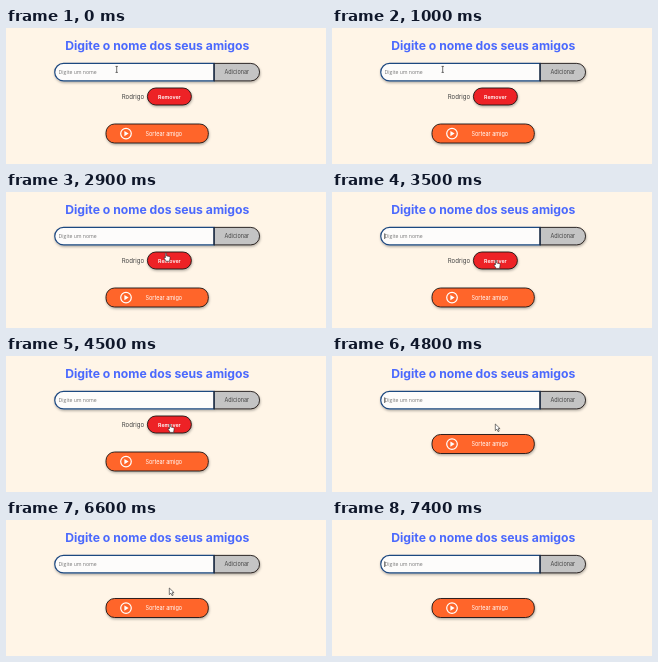
An HTML page for the animation above (7500 ms loop, 320x136 px).

```html
<!DOCTYPE html>
<html lang="pt-BR">
<head>
<meta charset="utf-8">
<title>Amigo secreto</title>
<style>
  html, body { margin: 0; width: 100%; height: 100%; overflow: hidden; background: #fff5e7; }
  svg { display: block; width: 100%; height: 100%; }
  text { font-family: Inter, Roboto, sans-serif; font-size: 5.5px; fill: #444; }
  .title { font-size: 12.2px; font-weight: 700; fill: #4b69fd; text-anchor: middle; }
  .hint { font-family: "Open Sans", "Noto Sans", sans-serif; font-size: 5.1px; fill: #777; }
  .name { font-size: 6.1px; text-anchor: end; }
  .mid { text-anchor: middle; }
  .light { fill: #fff; }
  .bold { font-weight: 600; }
  .edge { stroke: #1c1614; stroke-width: .9; }
</style>
</head>
<body>
<svg viewBox="0 0 320 136">
  <defs>
    <filter id="shadow" x="-10%" y="-20%" width="120%" height="160%">
      <feDropShadow dx=".5" dy="1.4" stdDeviation="1" flood-color="#000" flood-opacity=".3"/>
    </filter>
  </defs>
  <rect width="320" height="136" fill="#fff5e7"/>
  <text class="title" x="151.3" y="21.6">Digite o nome dos seus amigos</text>

  <g filter="url(#shadow)">
    <path class="edge" fill="#c4c4c4" d="M208 35.4H244.8a8.75 8.75 0 0 1 0 17.5H208Z"/>
    <path fill="#fdfcfb" stroke="#1d4880" stroke-width="1.2" d="M208 35.4H57.5a8.75 8.75 0 0 0 0 17.5H208Z"/>
  </g>
  <path d="M208 35V53.3" stroke="#1c1c22"/>
  <text class="hint" x="52.6" y="46.1">Digite um nome</text>
  <text class="mid" x="230.8" y="46.2">Adicionar</text>
  <path id="caret" d="M52.7 41.4v5.6" stroke="#222" stroke-width=".7"/>

  <g id="friend">
    <text class="name" x="138.2" y="70.6">Rodrigo</text>
    <rect class="edge" x="141.4" y="60" width="44" height="17" rx="8.5" fill="#ed2226" filter="url(#shadow)"/>
    <text class="mid light bold" x="163.4" y="70.6" style="font-size:5.3px">Remover</text>
  </g>

  <g id="draw">
    <rect class="edge" x="100" y="96" width="102.3" height="19" rx="8.6" fill="#ff652b" filter="url(#shadow)"/>
    <circle cx="120" cy="105.6" r="5.3" fill="none" stroke="#fff" stroke-width="1.2"/>
    <path d="M118.4 102.9v5.4l4.2-2.7Z" fill="#fff"/>
    <text class="light" x="139.5" y="107.6">Sortear amigo</text>
  </g>

  <g id="cursor">
    <path id="beam" d="M-1.2-3H1.2M0-3V3M-1.2 3H1.2" fill="none" stroke="#333" stroke-width=".7"/>
    <path id="arrow" d="M0 0V6.6L1.6 5.2 2.7 7.6 3.9 7.1 2.8 4.7H4.8Z" fill="#fff" stroke="#222" stroke-width=".6"/>
    <path id="hand" d="M.1.5Q.7-.4 1.3.5V3L4.2 3.6Q5 3.9 4.9 4.8L4.3 8.4H.9L-1.2 5.2Q-1.2 4.2-.3 4.6L.1 5Z" fill="#fff" stroke="#222" stroke-width=".6"/>
  </g>
</svg>
<script>
const LOOP = 7500, REMOVED = 4650, REFOCUSED = 4770, HIDDEN = 7300, BLINK = 530;
const BEFORE_PHASE = 2200 - 6 * BLINK;
const PATH = [[0, 110.7, 41.4], [1500, 110.7, 41.4], [2300, 147.5, 40.3], [2500, 147.5, 40.3], [3100, 163.3, 68]];

const $ = id => document.getElementById(id);
const show = (id, on) => $(id).setAttribute("visibility", on ? "visible" : "hidden");
const move = (id, x, y) => $(id).setAttribute("transform", `translate(${x} ${y})`);
const ease = p => p * p * (3 - 2 * p);

function cursorAt(t) {
  const next = PATH.findIndex(point => point[0] > t);
  if (next < 0) return PATH[PATH.length - 1].slice(1);
  const [t0, x0, y0] = PATH[next - 1], [t1, x1, y1] = PATH[next];
  const p = ease((t - t0) / (t1 - t0));
  return [x0 + (x1 - x0) * p, y0 + (y1 - y0) * p];
}

function caretOn(t) {
  const start = t < REFOCUSED - BLINK ? BEFORE_PHASE : REFOCUSED - 2 * BLINK;
  return Math.floor((t - start) / BLINK) % 2 === 0;
}

function render(t) {
  const [x, y] = cursorAt(t);
  const removed = t >= REMOVED;
  const inField = y < 53, onButton = !removed && y > 60;
  const visible = t < HIDDEN;
  show("friend", !removed);
  move("draw", 0, removed ? -17.5 : 0);
  show("caret", caretOn(t));
  move("cursor", x, y);
  show("beam", visible && inField);
  show("hand", visible && onButton);
  show("arrow", visible && !inField && !onButton);
}

const started = performance.now();
function tick() {
  render((performance.now() - started) % LOOP);
  requestAnimationFrame(tick);
}
tick();
</script>
</body>
</html>
```
